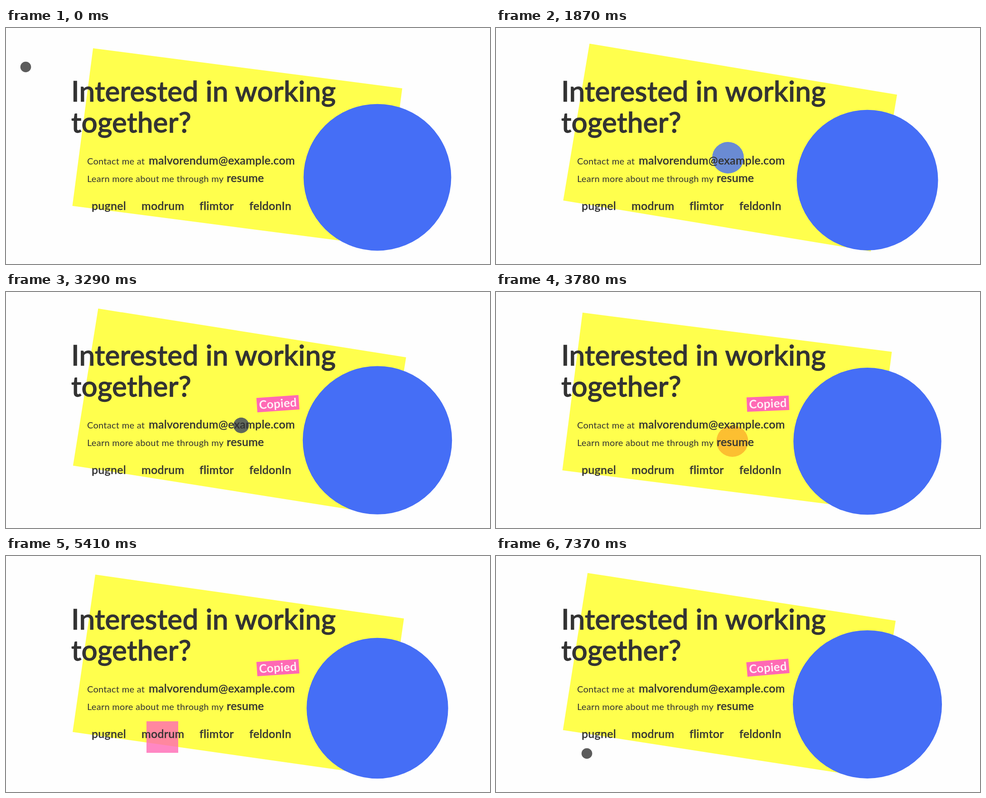
Animation of 1068x524 px, one loop 7.4 s. Source, as an HTML page:

```html
<!DOCTYPE html>
<html lang="en">
<head>
<meta charset="utf-8">
<title>Contact</title>
<style>
  html, body { margin: 0; width: 100%; height: 100%; overflow: hidden; background: #fefefe; }
  svg { display: block; width: 100vw; height: 100vh; }
  text { font-family: Lato, sans-serif; fill: #333; stroke: #333; stroke-width: 0; letter-spacing: .28px; }
  .title { font-size: 62px; font-weight: 500; stroke-width: 1.3px; }
  .note { font-size: 20px; }
  .link { font-size: 25px; font-weight: 500; stroke-width: .4px; }
  #tag text { font-size: 26px; font-weight: 700; fill: #fff0f7; text-anchor: middle; }
</style>
</head>
<body>
<svg viewBox="0 0 1068 524">
  <rect id="panel" x="143.6" y="86.5" width="688" height="353" fill="#ffff4d"/>
  <circle id="ball" cx="819.5" fill="#456ef6"/>
  <rect id="cursor" opacity=".8"/>
  <text class="title" x="144" y="163">Interested in working</text>
  <text class="title" x="144" y="232">together?</text>
  <text class="note" x="179" y="303">Contact me at</text>
  <text class="link" x="315" y="303">malvorendum@example.com</text>
  <text class="note" x="179" y="342">Learn more about me through my</text>
  <text class="link" x="487" y="342">resume</text>
  <text class="link" x="189" y="404">pugnel</text>
  <text class="link" x="299" y="404">modrum</text>
  <text class="link" x="427" y="404">flimtor</text>
  <text class="link" x="537" y="404">feldonIn</text>
  <g id="tag">
    <rect x="553.5" y="232" width="93" height="32" fill="#ff69b4"/>
    <text x="600" y="257">Copied</text>
  </g>
</svg>
<script>
const LOOP = 7400, TAG_START = 2250;
const [panel, ball, cursor, tag] =
  ['panel', 'ball', 'cursor', 'tag'].map(id => document.getElementById(id));

const clamp = v => Math.max(0, Math.min(1, v));
const mix = (a, b, k) => a + (b - a) * k;
const ease = u => (1 - Math.cos(Math.PI * clamp(u))) / 2;

// Sways between high and low, turning at the given times; the first turn is a high
function sway(high, low, turns) {
  return t => {
    const i = turns.findLastIndex(turn => t >= turn);
    const k = ease((t - turns[i]) / (turns[i + 1] - turns[i]));
    return i % 2 ? mix(low, high, k) : mix(high, low, k);
  };
}

const panelTilt = sway(10.5, 6.35, [-773, 400, 2604, 4310, 6726, 8220]);
const ballSize = sway(330, 311.5, [-800, 1750, 2970, 5800, 6950, 9800]);
const tagTilt = sway(-7.8, -1, [1577, 4770, 6200, 8783]);

const look = (half, rx, ...rgb) => [half, rx, ...rgb];
const dot = look(11.8, 11.8, 51, 51, 51);
const blue = look(35, 35, 69, 110, 246);
const orange = look(35, 35, 252, 175, 43);
const purple = look(35, 0, 169, 132, 253);
const pink = look(35, 0, 255, 105, 180);
const green = look(35, 0, 172, 238, 182);

const stop = (arrive, leave, x, y, look) => ({ arrive, leave, x, y, look });
const stops = [
  stop(0, 850, 43.5, 86.5, dot),
  stop(1650, 1870, 512, 288, blue),
  stop(2640, 3200, 518.5, 290, blue),
  stop(3560, 3900, 521.5, 331, orange),
  stop(4400, 4700, 453.5, 406.5, purple),
  stop(5150, 5450, 345, 402, pink),
  stop(6000, 6600, 242.5, 397.5, green),
  stop(7370, LOOP, 200.5, 438.5, dot)
];

// Travels from stop to stop, shrinking to a dot halfway unless both look alike
function cursorAt(t) {
  const i = stops.findLastIndex(s => t >= s.arrive);
  const from = stops[i], to = stops[i + 1] ?? from;
  const u = to === from ? 0 : clamp((t - from.leave) / (to.arrive - from.leave));
  const near = (u < .5 ? from : to).look;
  const grown = from.look === to.look ? 1 : clamp((Math.abs(u - .5) - .2) / .2);
  return {
    x: mix(from.x, to.x, ease(u)),
    y: mix(from.y, to.y, ease(u)),
    look: near.map((v, n) => mix(dot[n], v, grown))
  };
}

function set(el, attrs) {
  for (const name in attrs) el.setAttribute(name, attrs[name]);
}

function draw(t) {
  const angle = panelTilt(t), r = ballSize(t) / 2;
  set(panel, { transform: `rotate(${angle} 487.6 439.5)` });
  set(ball, { r, cy: 494.9 - .4 * (angle - 6.4) - r });

  const { x, y, look: [half, rx, ...rgb] } = cursorAt(t);
  set(cursor, {
    x: x - half, y: y - half, width: half * 2, height: half * 2,
    rx, fill: `rgb(${rgb.map(Math.round)})`
  });

  const shown = t >= TAG_START;
  set(tag, {
    transform: shown ? `rotate(${tagTilt(t)} 600 248)` : '',
    opacity: clamp((t - TAG_START) / 120)
  });
}

function frame() {
  draw(performance.now() % LOOP);
  requestAnimationFrame(frame);
}
frame();
</script>
</body>
</html>
```
